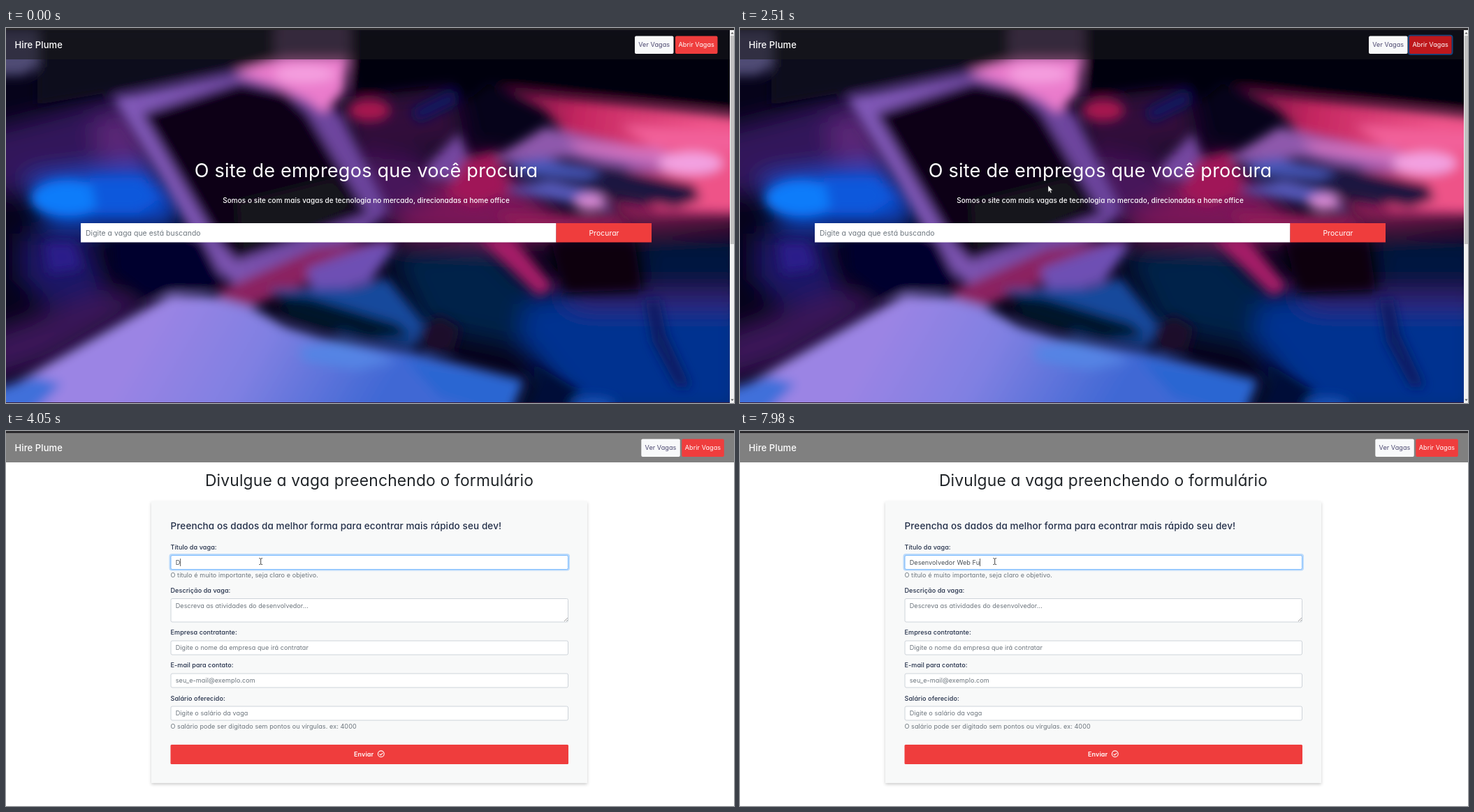
These frames come from a looping animation (1042x538 px, 8000 ms). An HTML page:

```html
<!DOCTYPE html>
<html lang="pt-BR">
<head>
<meta charset="utf-8">
<title>Vagas</title>
<style>
html, body { margin: 0; width: 100%; height: 100%; overflow: hidden; background: #fff; }
svg { display: block; width: 1042px; height: 538px; }
text { font: 400 9.05px Inter, "Open Sans", sans-serif; font-feature-settings: "cv11"; letter-spacing: .008em; white-space: pre; }
.mid { text-anchor: middle; }
.white { fill: #fff; }
.brand { font-size: 13px; font-weight: 500; fill: #fff; }
.hero { font-size: 27.1px; fill: #fff; }
.lead { font-size: 9.95px; font-weight: 500; fill: #fff; }
.search { font-size: 10.35px; }
.h1 { font-size: 22.8px; fill: #212529; }
.h4 { font-size: 13.5px; font-weight: 500; fill: #24304a; }
.label { font-weight: 500; fill: #24304a; }
.hint { fill: #6c757d; }
.typed { fill: #495057; }
.field { fill: #fff; stroke: #ced4da; stroke-width: 1; }
.red { fill: #ef3d3d; }
</style>
</head>
<body>
<svg viewBox="0 0 1042 538">
<defs>
  <filter id="soft" filterUnits="userSpaceOnUse" x="-60" y="-60" width="1160" height="660"><feGaussianBlur stdDeviation="17"/></filter>
  <filter id="mild" filterUnits="userSpaceOnUse" x="-60" y="-60" width="1160" height="660"><feGaussianBlur stdDeviation="8"/></filter>
  <filter id="shade" x="-5%" y="-5%" width="110%" height="112%"><feDropShadow dx="0" dy="2" stdDeviation="2" flood-opacity=".2"/></filter>
  <linearGradient id="desk" gradientUnits="userSpaceOnUse" x1="230" y1="390" x2="520" y2="560">
    <stop offset="0" stop-color="#9b84e4"/><stop offset=".45" stop-color="#8080e2"/><stop offset="1" stop-color="#3f68d4"/>
  </linearGradient>
  <linearGradient id="sweep" gradientUnits="userSpaceOnUse" x1="700" y1="100" x2="1000" y2="140">
    <stop offset="0" stop-color="#5a0c3c"/><stop offset=".4" stop-color="#c42660"/><stop offset="1" stop-color="#ee5288"/>
  </linearGradient>
  <linearGradient id="frame" gradientUnits="userSpaceOnUse" x1="200" y1="240" x2="520" y2="150">
    <stop offset="0" stop-color="#8159b8"/><stop offset="1" stop-color="#6a429a"/>
  </linearGradient>
  <clipPath id="view"><path d="M0 3H1036V538H0Z"/></clipPath>
</defs>

<g id="home">
  <g clip-path="url(#view)">
    <path fill="#06031a" d="M0 0H1042V538H0Z"/>
    <g filter="url(#soft)">
      <path fill="#32165a" d="M-40 150L170 95L230 230L-40 240Z"/>
      <path fill="#5c2678" d="M125 135L180 120L210 195L135 190Z"/>
      <path fill="#0a49c8" d="M30 215L190 195L250 240L240 285L60 285Z"/>
      <path fill="#1c1266" d="M20 295H120L145 385L60 400L20 360Z"/>
      <path fill="#3a1658" d="M-30 440L150 375L215 390L60 480L-30 510Z"/>
      <path fill="#300c3a" d="M470 100L640 85L660 170L500 180Z"/>
      <path fill="#7a1858" d="M540 235L700 180L790 270L780 310L560 300Z"/>
      <path fill="#06204a" d="M550 320L690 310L770 390L740 460L600 430Z"/>
      <path fill="#04123f" d="M905 300H1060V400H920Z"/>
      <path fill="#063390" d="M745 395L800 375L1060 395V560H820L735 450Z"/>
      <path fill="#3a1a6e" d="M790 378H1060V400H820Z"/>
      <path fill="#94205c" d="M850 240L1060 220V275L880 285Z"/>
      <path fill="#46185a" d="M490 180L600 185L620 240L540 280L510 250Z"/>
    </g>
    <g filter="url(#mild)">
      <path fill="url(#sweep)" d="M705 86L820 102L1060 128V265L930 262L880 190L800 150L770 118Z"/>
      <path fill="#f2619a" d="M880 140L1060 150V180L930 172Z"/>
      <path fill="#8e58ac" d="M690 192L772 142L840 158L950 180L1010 210L900 204L800 186Z"/>
      <path fill="#d070bc" d="M800 162L930 172L1000 195L940 198L826 178Z"/>
      <ellipse fill="#f3a2e2" cx="980" cy="194" rx="46" ry="16"/>
      <path fill="#1c1240" d="M730 192L850 196L985 225L995 245L960 258L850 238L730 215Z"/>
      <path fill="#4656b8" d="M715 194L770 186L855 208L830 216L740 208Z"/>
      <path fill="#5458b8" d="M705 232L780 220L850 238L870 262L790 248Z"/>
      <ellipse fill="#dc8cd6" cx="836" cy="250" rx="23" ry="11"/>
      <path fill="#8f1a58" d="M700 265L870 268L900 285L740 298Z"/>
      <path fill="#7446a0" d="M605 195L648 150L662 185L640 218L600 215Z"/>
      <path fill="#a01858" d="M655 190L700 178L720 235L670 255L630 240Z"/>
      <path fill="#080310" d="M780 308H900L910 375L800 380Z"/>
      <path fill="#a51e68" d="M675 300H725L785 372L762 385Z"/>
      <ellipse fill="#a81850" cx="520" cy="118" rx="30" ry="16"/>
      <path fill="#0c1560" d="M580 118L640 88L646 108L590 135Z"/>
      <path fill="#05020e" d="M490 0H1060V118L780 88L690 80L660 105L640 78L500 95Z"/>
      <path fill="#100b1c" d="M45 0H390V50L150 92L45 110Z"/>
      <path fill="#504c74" d="M-20 0H45V55L25 68H-20Z"/>
      <path fill="url(#frame)" d="M153 100L340 62L440 95L480 125L548 262L500 305L325 368L285 330L225 220Z"/>
      <path fill="#5a3c66" d="M385 -20H492V45H385Z"/>
      <path fill="#ea7ccc" d="M325 64L400 42H490L484 92L455 122L432 104L385 82Z"/>
      <ellipse fill="#f5a0e0" cx="428" cy="66" rx="44" ry="12"/>
      <ellipse fill="#087cfa" cx="88" cy="244" rx="52" ry="26"/>
      <path fill="#1058dc" d="M120 215L195 215L220 245L190 265H130Z"/>
      <path fill="#2c1d8a" d="M55 308H98L108 345L62 352Z"/>
      <path fill="#05052e" d="M150 290L280 300L315 370L200 385L155 350Z"/>
      <path fill="#8b2060" d="M310 375L440 318L560 300L470 350L350 400L290 398Z"/>
      <path fill="#6e50b4" d="M430 345L530 308L560 310L520 365L440 385Z"/>
      <path fill="#164a9c" d="M375 375L500 372L545 358L600 425L585 458L480 440Z"/>
      <path fill="#1c0a2c" d="M590 435L620 412L650 430L640 465L600 465Z"/>
      <path fill="url(#desk)" d="M-30 535L60 482L235 383L290 384L350 400L400 428L450 443L580 465L742 505L715 560H-30Z"/>
      <path fill="#04122c" d="M392 382L435 386L560 424L582 444L520 446L440 426L400 412Z"/>
      <path fill="#5484e4" d="M420 458L480 450L560 478L500 490L425 478Z"/>
      <path fill="#2a66d2" d="M570 474L742 505L720 560L620 530Z"/>
      <path fill="#3f70da" d="M-20 520L40 500L80 510L30 560H-20Z"/>
      <path fill="#050d38" d="M745 475L820 520L800 560H735L762 505Z"/>
      <path fill="#081a60" d="M915 390H935L945 440L980 515L960 515L925 450Z"/>
      <ellipse fill="#1a54b8" cx="840" cy="540" rx="32" ry="10"/>
      <path fill="#090616" d="M195 123L335 78L400 92L432 122L475 195L518 266L330 334L300 302Z"/>
      <path fill="#15131f" d="M330 250L470 215L500 258L335 320Z"/>
    </g>
    <path fill="#19191c" fill-opacity=".56" d="M0 3H1036V45H0Z"/>
    <path fill="#3a2038" d="M0 537H1036V538H0Z"/>
  </g>
  <path fill="#f1f1f1" d="M1036 3H1042V538H1036Z"/>
  <path fill="#c1c1c1" d="M1037 11H1042V310H1037Z"/>
  <path fill="#555" d="M1037.5 8.5L1039.5 6L1041.5 8.5ZM1037.5 532.5L1039.5 535L1041.5 532.5Z"/>
  <text class="hero mid" x="515.5" y="213.7">O site de empregos que você procura</text>
  <text class="lead mid" x="515.5" y="251.2">Somos o site com mais vagas de tecnologia no mercado, direcionadas a home office</text>
  <path fill="#fff" d="M107 280H787.5V307.5H107Z"/>
  <path class="red" d="M787.5 280H924V307.5H787.5Z"/>
  <text class="search hint" x="114" y="298">Digite a vaga que está buscando</text>
  <text class="search white mid" x="856" y="298">Procurar</text>
</g>

<g id="form">
  <path fill="#fff" d="M0 0H1042V538H0Z"/>
  <path fill="#808080" d="M0 3H1042V45H0Z"/>
  <text class="h1 mid" x="520" y="78.5">Divulgue a vaga preenchendo o formulário</text>
  <path fill="#f8f9f9" filter="url(#shade)" d="M208 101H832V505H208Z"/>
  <text class="h4" x="235.5" y="140.7">Preencha os dados da melhor forma para econtrar mais rápido seu dev!</text>
  <g id="fields"></g>
  <text class="hint" x="235.5" y="210.2">O título é muito importante, seja claro e objetivo.</text>
  <text class="hint" x="235.5" y="427">O salário pode ser digitado sem pontos ou vírgulas. ex: 4000</text>
  <path stroke="#777" stroke-width=".7" d="M799 273L804 268M802 273L804 271"/>
  <rect id="glow" x="235.5" y="178" width="569.5" height="20.5" rx="2" fill="none" stroke="#007bff" stroke-opacity=".25" stroke-width="4"/>
  <rect id="edge" x="236" y="178.5" width="568.5" height="20" rx="2" fill="#fff" stroke="#80bdff"/>
  <text id="first" class="hint" x="242.7" y="191.5">Digite o título da vaga</text>
  <text id="typed" class="typed" x="242.7" y="191.5"></text>
  <path id="caret" fill="#333" d="M0 183H.8V194H0Z"/>
  <rect class="red" x="235.5" y="450" width="569.5" height="28" rx="1.5"/>
  <text class="white" style="font-weight:600" x="498" y="467">Enviar</text>
  <g fill="none" stroke="#fff" stroke-width="1.1"><circle cx="536.8" cy="463.3" r="4.4"/><path d="M534.6 463.4L536.3 465L539.2 461.8"/></g>
</g>

<path fill="#2b2a2d" d="M0 0H1042V3H0Z"/>
<text class="brand" x="12.5" y="28.5">Hire Plume</text>
<g id="nav">
  <rect x="900" y="11.5" width="55.5" height="25.5" rx="2" fill="#f8f9fa"/>
  <text class="mid" fill="#4b4870" x="927.7" y="27.2">Ver Vagas</text>
  <rect id="ring" x="957" y="10.7" width="62.5" height="27" rx="3" fill="none" stroke="#17467f" stroke-width="2"/>
  <rect id="open" x="958" y="11.5" width="60.5" height="25.5" rx="2"/>
  <text class="white mid" x="988.2" y="27.2">Abrir Vagas</text>
</g>

<g id="cursor">
  <path id="arrow" fill="#fff" stroke="#222" stroke-width=".5" d="M0 0V9.4L2.1 7.5L3.6 10.8L5 10.2L3.6 6.9H6.5Z"/>
  <path id="hand" fill="#fff" stroke="#222" stroke-width=".6" d="M-1 0Q0-1 1 0V4L5 5Q6 5.5 5.7 7L5 11H-1L-4 7Q-4 5.5-2.6 6.2L-1 7Z"/>
  <path id="beam" fill="none" stroke="#333" stroke-width=".9" d="M-2.4-4.4Q0-4.4 0-3.4Q0-4.4 2.4-4.4M0-3.4V3.6M-2.4 4.6Q0 4.6 0 3.6Q0 4.6 2.4 4.6"/>
</g>
</svg>
<script>
const LOOP = 8000, HOVER = 1720, CLICK = 2030, PAGE = 2570, FOCUS = 3520, BLINK = 535;
const phrase = "Desenvolvedor Web Fu";
const keyTimes = [4050, 4310, 4460, 4610, 4780, 4930, 5000, 5170, 5245, 5320,
  5550, 5720, 5800, 5950, 6560, 6790, 7030, 7200, 7730, 7980];

// start, end, steps, from x, y, to x, y
const moves = [
  [70, 310, 4, 1002, 512, 919, 425],
  [390, 470, 2, 920, 408, 924, 398],
  [1020, 1570, 8, 931, 388, 995, 47],
  [1720, 1790, 2, 993, 35, 990, 27],
  [2210, 2510, 5, 975, 32, 441, 226],
  [2570, 2730, 3, 407, 242.5, 395, 248],
  [2880, 3200, 5, 391, 243, 364.7, 187]
];

// label, label baseline, box top, box height, placeholder
const fields = [
  ["Título da vaga:", 170, 178.5, 20, ""],
  ["Descrição da vaga:", 232, 240.5, 33.5, "Descreva as atividades do desenvolvedor..."],
  ["Empresa contratante:", 292.3, 301, 20, "Digite o nome da empresa que irá contratar"],
  ["E-mail para contato:", 339.3, 348, 20, "seu_e-mail@exemplo.com"],
  ["Salário oferecido:", 386.5, 395, 20, "Digite o salário da vaga"]
];

const $ = id => document.getElementById(id);
const show = (id, on) => { $(id).style.display = on ? "" : "none"; };
const clamp = v => Math.max(0, Math.min(1, v));

$("fields").innerHTML = fields.map(([label, base, top, height, hint]) => `
  <text class="label" x="235.5" y="${base}">${label}</text>
  <rect class="field" x="236" y="${top}" width="568.5" height="${height}" rx="2"/>
  <text class="hint" x="242.7" y="${top + 13}">${hint}</text>`).join("");

function pointer(t) {
  const move = moves.filter(m => m[0] <= t).pop();
  if (!move) return null;
  const [start, end, steps, x0, y0, x1, y1] = move;
  const count = steps - 1;
  const part = Math.floor(clamp((t - start) / (end - start)) * count + 1e-6) / count;
  const ease = part * part * (3 - 2 * part);
  return [x0 + (x1 - x0) * ease, y0 + (y1 - y0) * ease];
}

function drawPointer(t) {
  const at = pointer(t);
  show("cursor", at);
  if (!at) return;
  const beam = t >= PAGE;
  const hand = !beam && at[0] > 957 && at[1] < 38;
  show("beam", beam);
  show("hand", hand);
  show("arrow", !beam && !hand);
  $("cursor").setAttribute("transform", `translate(${at})`);
}

function drawTyping(t) {
  const keys = keyTimes.filter(k => k <= t);
  const focused = t >= FOCUS;
  const since = t - (keys.length ? keys[keys.length - 1] : FOCUS);
  const typed = $("typed");
  typed.textContent = phrase.slice(0, keys.length);
  show("first", !keys.length);
  show("glow", focused);
  show("edge", focused);
  show("caret", focused && since % (2 * BLINK) < BLINK);
  const width = keys.length ? typed.getComputedTextLength() : 0;
  $("caret").setAttribute("transform", `translate(${242.7 + width})`);
}

function draw(t) {
  const form = t >= PAGE;
  show("home", !form);
  show("form", form);
  $("nav").setAttribute("transform", `translate(${form ? 9.3 : 0})`);
  show("ring", !form && t >= CLICK);
  const dark = form ? 0 : clamp((t - HOVER) / 150);
  const mix = (a, b) => Math.round(a + (b - a) * dark);
  $("open").setAttribute("fill", `rgb(${mix(239, 190)},${mix(61, 24)},${mix(61, 28)})`);
  if (form) drawTyping(t);
  drawPointer(t);
}

const begin = performance.now();
function tick() {
  draw((performance.now() - begin) % LOOP);
  requestAnimationFrame(tick);
}
tick();
</script>
</body>
</html>
```
